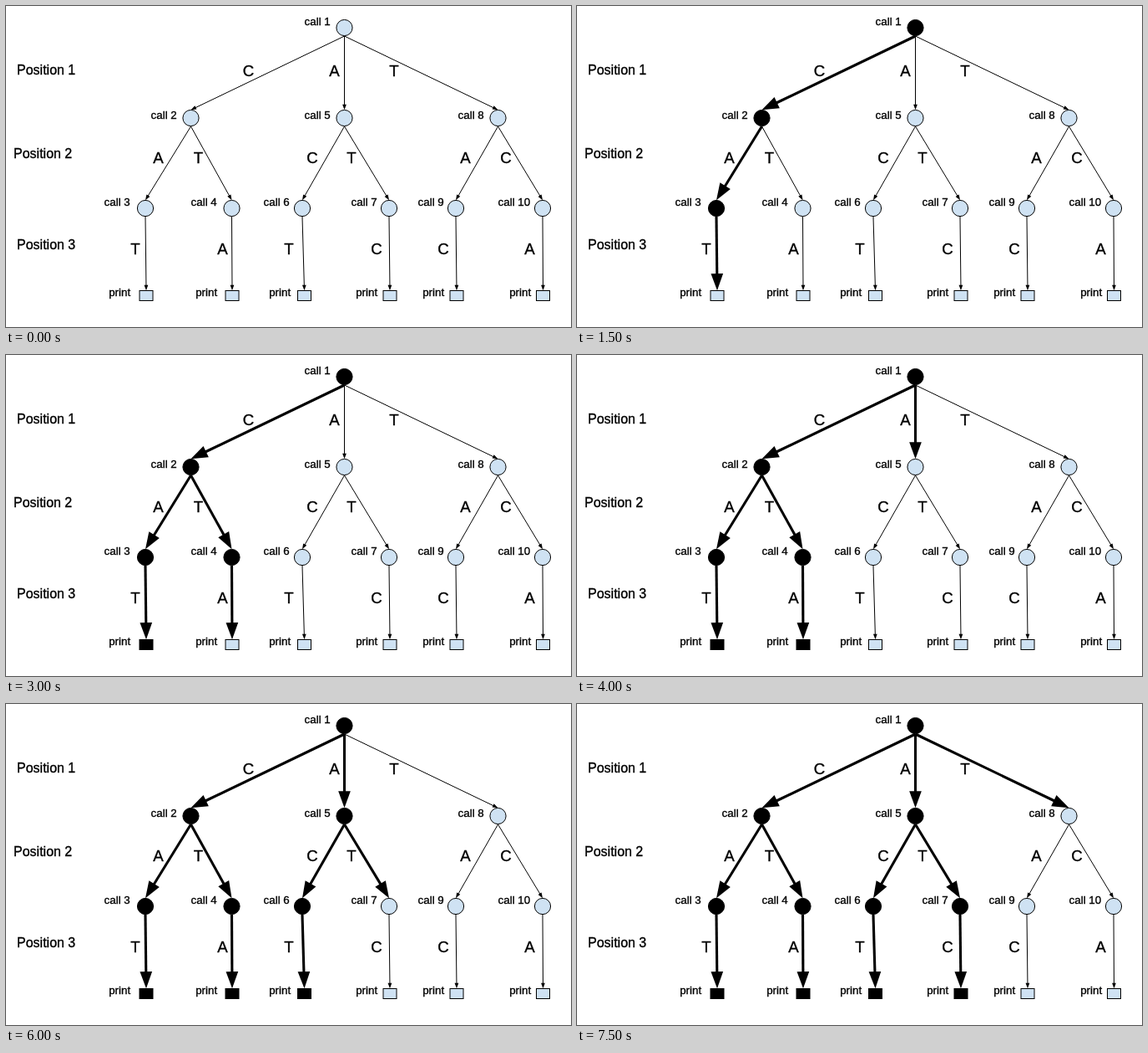
Animation of 677x384 px, one loop 8 s. Source, as an HTML page:

```html
<!DOCTYPE html>
<html lang="en">
<head>
<meta charset="utf-8">
<title>Call tree</title>
<style>
  html, body { margin: 0; width: 100%; height: 100%; overflow: hidden; background: #fff; }
  svg { display: block; width: 677px; height: 384px; }
  text { font-family: "Liberation Sans", Arial, sans-serif; stroke: #000; stroke-width: .35px; }
  .level { font-size: 16px; }
  .letter { font-size: 18.67px; text-anchor: middle; }
  .label { font-size: 13.33px; }
  .shape { fill: #cfe2f3; stroke: #000; }
  .shape.on { fill: #000; }
</style>
</head>
<body>
<svg id="stage" viewBox="0 0 677 384"></svg>
<script>
const STEP = 500, STEPS = 16, NEVER = 99;
const THIN = 1, THICK = 3.1;
const stage = document.getElementById('stage');
const updates = [];

// call number: x, y, label x, step at which it turns black
const calls = {
  1: [405.5, 26, 358, 1],
  2: [221.5, 134, 174, 2],
  3: [167, 242, 118, 3],
  4: [270.5, 242, 222, 6],
  5: [405.5, 134, 358, 9],
  6: [355, 242, 309, 10],
  7: [459, 242, 414, 13],
  8: [589.5, 134, 542, NEVER],
  9: [539, 242, 494, NEVER],
  10: [643, 242, 590, NEVER]
};

// parent, child, letter, letter x, step
const branches = [
  [1, 2, 'C', 290.5, 1], [1, 5, 'A', 393.5, 8], [1, 8, 'T', 465, 15],
  [2, 3, 'A', 182.5, 2], [2, 4, 'T', 230.5, 5],
  [5, 6, 'C', 367, 9], [5, 7, 'T', 414, 12],
  [8, 9, 'A', 550.5, NEVER], [8, 10, 'C', 599, NEVER]
];

// call, box x, letter, letter x, label x, step of the box
const prints = [
  [3, 168, 'T', 155, 124, 4], [4, 271, 'A', 259.5, 228, 7],
  [6, 357.5, 'T', 339, 316, 11], [7, 460, 'C', 444, 420, 14],
  [9, 540, 'C', 524, 500, NEVER], [10, 643.5, 'A', 627.5, 604, NEVER]
];

function add(tag, attrs) {
  const el = document.createElementNS('http://www.w3.org/2000/svg', tag);
  for (const key in attrs) el.setAttribute(key, attrs[key]);
  return stage.appendChild(el);
}

function write(cls, x, y, words) {
  add('text', { class: cls, x, y }).textContent = words;
}

function shape(tag, attrs, start) {
  const el = add(tag, { class: 'shape', ...attrs });
  updates.push(step => el.classList.toggle('on', step >= start));
}

function arrow(x1, y1, x2, y2, start) {
  const line = add('line', { x1, y1, stroke: '#000' });
  const head = add('path', {});
  const len = Math.hypot(x2 - x1, y2 - y1);
  const ux = (x2 - x1) / len, uy = (y2 - y1) / len;
  updates.push(step => {
    const w = step >= start ? THICK : THIN;
    const bx = x2 - ux * 6.5 * w, by = y2 - uy * 6.5 * w;
    const hx = -uy * 2.365 * w, hy = ux * 2.365 * w;
    line.setAttribute('x2', bx + ux);
    line.setAttribute('y2', by + uy);
    line.setAttribute('stroke-width', w);
    head.setAttribute('d', `M${x2} ${y2}L${bx + hx} ${by + hy}L${bx - hx} ${by - hy}Z`);
  });
}

for (const [from, to, letter, x, start] of branches) {
  const [x1, y1] = calls[from], [x2, y2] = calls[to];
  arrow(x1, y1 + 10, x2, y2 - 9.7, start);
  write('letter', x, from === 1 ? 83.5 : 187.5, letter);
}

for (const [call, x, letter, letterX, labelX, start] of prints) {
  const [cx, cy, , edgeStart] = calls[call];
  arrow(cx, cy + 10, x, 340.3, edgeStart);
  shape('rect', { x: x - 8, y: 340.5, width: 16, height: 12 }, start);
  write('letter', letterX, 296.5, letter);
  write('label', labelX - .8, 347, 'print');
}

for (const n in calls) {
  const [cx, cy, labelX, start] = calls[n];
  shape('circle', { cx, cy, r: 9.6 }, start);
  write('label', labelX - .4, cy - (cy === 134 ? -1 : 3), 'call ' + n);
}

write('level', 13, 82, 'Position 1');
write('level', 9, 182, 'Position 2');
write('level', 13, 291, 'Position 3');

const begin = performance.now();
let shown = -1;
function draw() {
  const step = Math.floor((performance.now() - begin) / STEP) % STEPS;
  if (step !== shown) {
    shown = step;
    updates.forEach(update => update(step));
  }
  requestAnimationFrame(draw);
}
draw();
</script>
</body>
</html>
```
